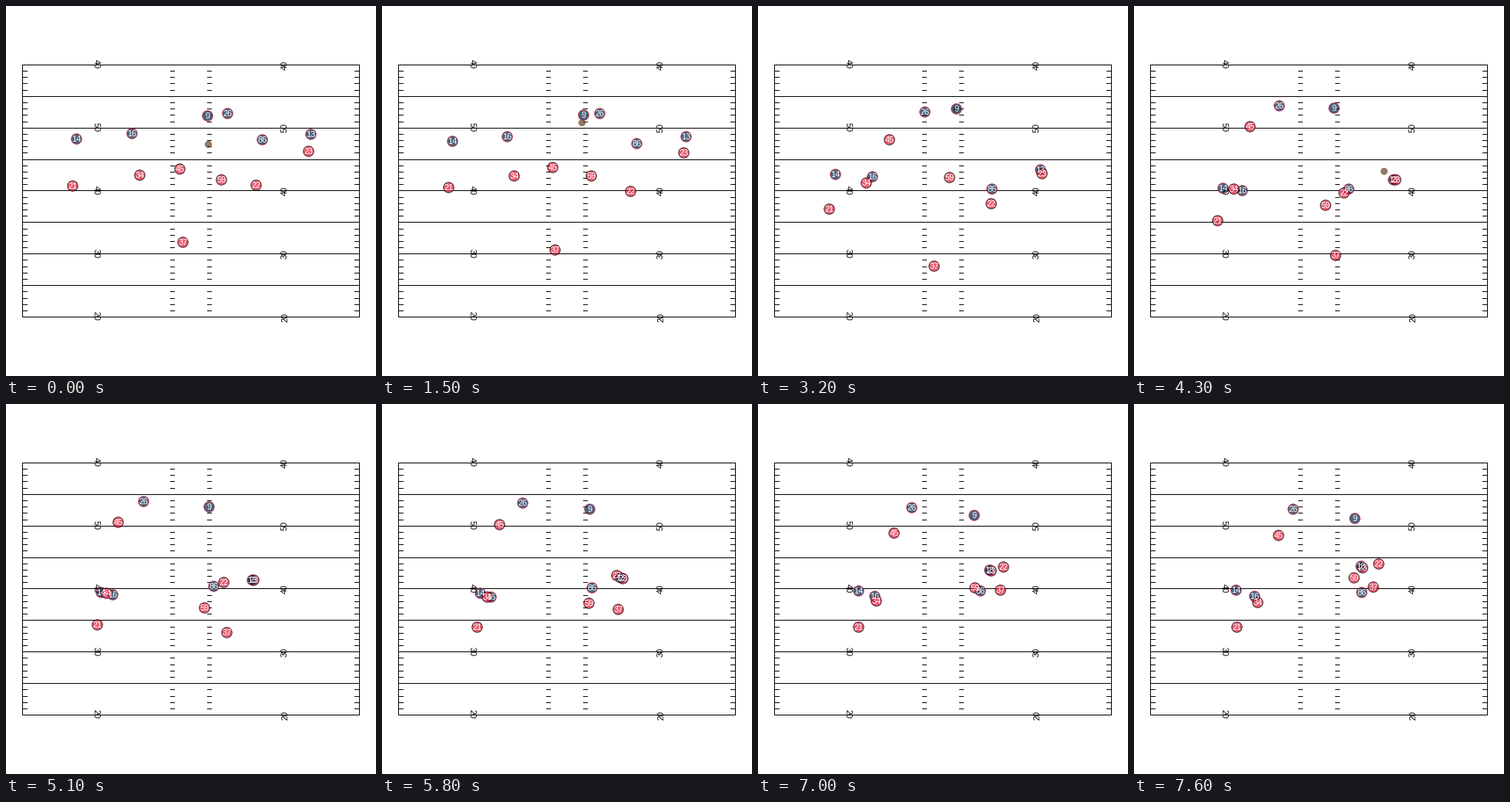
A matplotlib script for the animation above (7.7 s loop, 480 by 480 pixels).

```python
import numpy as np
import matplotlib.pyplot as plt
from matplotlib.animation import FuncAnimation
from matplotlib.patches import Circle

SIZE, DPI = 480, 100
FRAMES, INTERVAL = 77, 100
PX = 72 / DPI
FONT = "Liberation Sans"

HOME = dict(facecolor="#e31837", edgecolor="black")
AWAY = dict(facecolor="#002244", edgecolor="#c60c30")
BALL = dict(facecolor="#654321", edgecolor="none")

# Moments of the play, in frames
READ, SNAP, IN_HAND, THROW, CATCH, END = 6, 11, 16.4, 36, 44, 76
BALL_SPOT = np.array([262, 179])


def smooth_path(times, points):
    """Cubic path through a few points, starting from rest."""
    times, pts = np.array(times, float), np.array(points, float)
    h = np.diff(times)[:, None]
    d = np.diff(pts, axis=0) / h
    inner = (d[:-1] * h[1:] + d[1:] * h[:-1]) / (h[:-1] + h[1:])
    slopes = np.vstack([0 * d[:1], inner, d[-1:]])

    def at(t):
        t = np.clip(t, times[0], times[-1])
        i = min(np.searchsorted(times, t, side="right") - 1, len(h) - 1)
        step = h[i, 0]
        s = (t - times[i]) / step
        ease = s * s * (3 - 2 * s)
        return (pts[i] + ease * (pts[i + 1] - pts[i])
                + step * s * (1 - s) * ((1 - s) * slopes[i] - s * slopes[i + 1]))

    return at


def route(*points):
    return smooth_path((SNAP, 32, 47, END), points)


def roam(*points):
    return smooth_path((READ, 32, 43, 64, END), points)


def cover(number, *gaps):
    """Stay near an opponent, closing the gap over time."""
    gap = smooth_path((SNAP, 34, END), gaps)
    return lambda t: offense[number](t) + gap(t)


offense = {
    9: route((261, 142), (257, 133), (261, 132), (286, 148)),
    13: route((395, 166), (366, 212), (326, 227), (294, 210)),
    14: route((91, 172), (100, 218), (120, 241), (132, 241)),
    16: route((163, 165), (148, 221), (138, 244), (156, 249)),
    26: route((287, 139), (216, 137), (181, 127), (206, 136)),
    86: route((332, 173), (303, 237), (271, 236), (295, 244)),
}
defense = {
    21: cover(14, (-5, 61), (-8, 44), (1, 48)),
    23: cover(13, (-3, 22), (2, 4), (2, 2)),
    34: cover(16, (10, 54), (-9, 5), (4, 8)),
    45: cover(26, (-62, 72), (-44, 33), (-19, 34)),
    22: roam((324, 232), (302, 256), (272, 242), (317, 216), (317, 207)),
    37: roam((229, 306), (228, 337), (261, 323), (315, 248), (310, 237)),
    59: roam((279, 225), (248, 222), (248, 258), (276, 249), (285, 225)),
}
paths = {**offense, **defense}


def flight(start, end, t0, t1, t):
    return start + (end - start) * (t - t0) / (t1 - t0)


def ball_at(t):
    passer, receiver = offense[9], offense[13]
    if t <= SNAP:
        return BALL_SPOT
    if t < IN_HAND:
        return flight(BALL_SPOT, passer(IN_HAND) - (2, 0), SNAP, IN_HAND, t)
    if t < THROW:
        return passer(t)
    if t < CATCH:
        return flight(passer(THROW), receiver(CATCH), THROW, CATCH, t)
    return receiver(t) + (1, 1)


fig = plt.figure(figsize=(SIZE / DPI, SIZE / DPI), dpi=DPI, facecolor="white")
ax = fig.add_axes([0, 0, 1, 1])
ax.set(xlim=(0, SIZE), ylim=(SIZE, 0))
ax.axis("off")


def line(x0, y0, x1, y1):
    ax.plot([x0, x1], [y0, y1], color="black", lw=PX, snap=False,
            solid_capstyle="butt", zorder=1)


def draw_field():
    left, right, top, bottom = 21, 458, 76, 403
    for x in (left, right):
        line(x + 0.5, top, x + 0.5, bottom + 1)
    for yard in range(41):
        y = round(403.08 - 8.18 * yard) + 0.5
        if yard % 5 == 0:
            line(left, y, right + 1, y)
        else:
            for x in (22, 213, 261, 452):
                line(x, y, x + 6, y)
    style = dict(fontsize=11 * PX, family=FONT, ha="center", va="baseline",
                 rotation_mode="anchor", zorder=2)
    for i, label in enumerate(("40", "50", "40", "30", "20")):
        y = top + 81.75 * i
        ax.text(114, y - 0.5, label, rotation=270, **style)
        ax.text(365, y + 0.5, label, rotation=90, **style)


def add_dot(radius, style, zorder):
    return ax.add_patch(Circle((0, 0), radius, lw=PX, alpha=0.7,
                               zorder=zorder, **style))


draw_field()
ball = add_dot(4.6, BALL, 3)
dots, labels = {}, {}
for number in paths:
    away = number in offense
    dots[number] = add_dot(6.75, AWAY if away else HOME, 4 if away else 5)
    labels[number] = ax.text(0, 0, str(number), color="white", family=FONT,
                             fontsize=11 * PX, ha="center", va="baseline", zorder=8)


def update(frame):
    ball.center = tuple(np.round(ball_at(frame)) + 0.5)
    for number, path in paths.items():
        x, y = np.round(path(frame))
        dots[number].center = (x + 0.5, y + 0.5)
        labels[number].set_position((x + 0.5, y + 4))
    # The receiver is drawn on top once he has the ball
    dots[13].set_zorder(6 if frame >= CATCH else 4)
    return [ball, *dots.values(), *labels.values()]


anim = FuncAnimation(fig, update, frames=FRAMES, interval=INTERVAL,
                     repeat=True, repeat_delay=0, blit=False)
plt.show()
```
